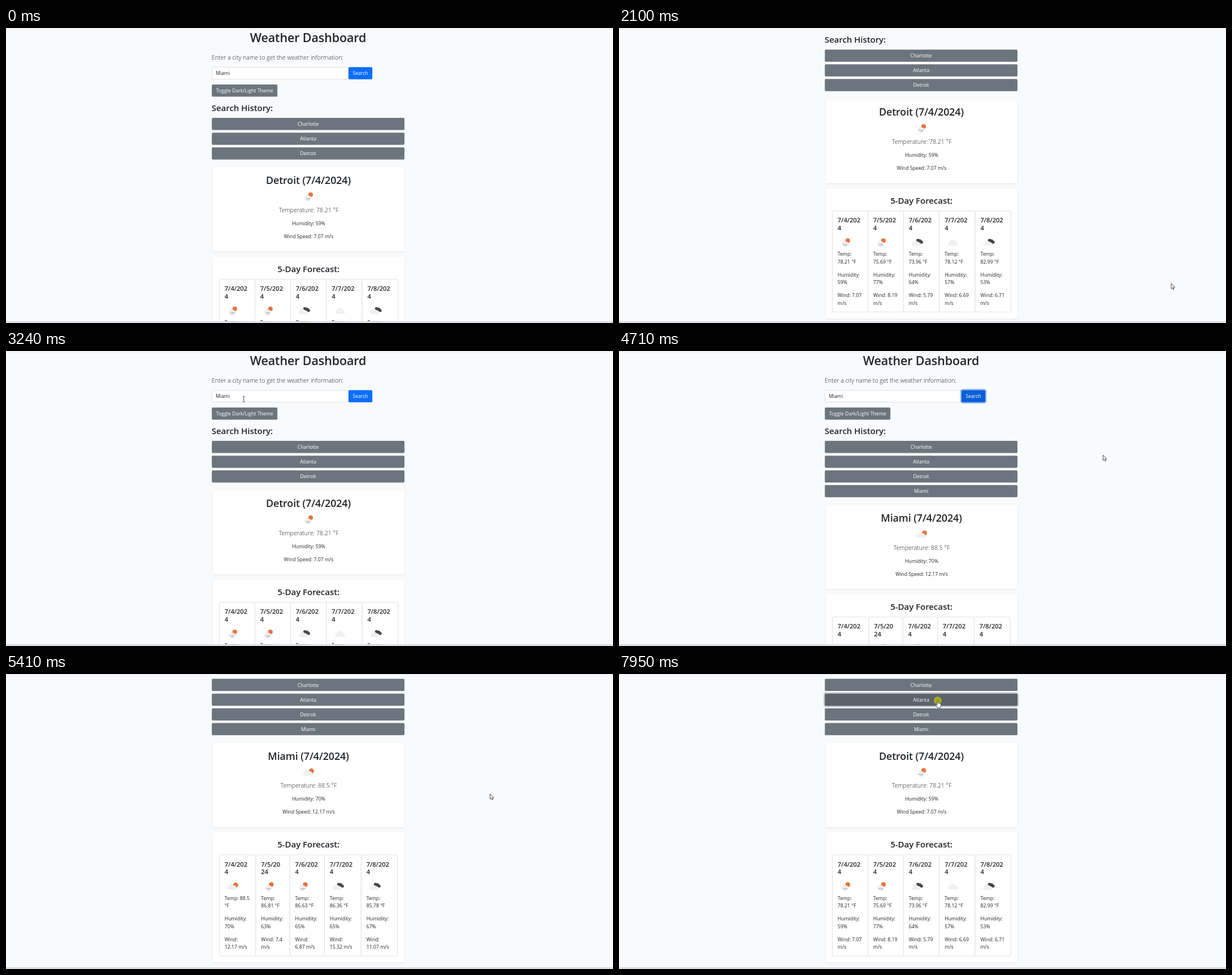
These frames come from a looping animation (1074 by 522 pixels, 8000 ms). An HTML page:

```html
<!DOCTYPE html>
<html lang="en">
<head>
<meta charset="utf-8">
<title>Weather Dashboard</title>
<style>
html, body { margin: 0; width: 100%; height: 100%; overflow: hidden; background: #f8fafc; }
svg { display: block; font: 8.7px "Open Sans", "Noto Sans", sans-serif; fill: #212529; }
.h1, .h2, .h3, .h5 { font-weight: 600; letter-spacing: -.006em; }
.h1 { font-size: 21.5px; }
.h2 { font-size: 17.9px; }
.h3 { font-size: 15.1px; }
.h5 { font-size: 11.2px; }
.lead { font-size: 10.6px; font-weight: 300; }
.mid { text-anchor: middle; }
.card { fill: #fff; filter: drop-shadow(0 1.1px 1.1px rgba(0, 0, 0, .09)); }
.box { fill: #fff; stroke: #d9dbde; stroke-width: .8; }
.btn { fill: #6c757d; }
.btn text { fill: #fff; }
.btn.on { fill: #5c636a; }
.btn.blue { fill: #0d6efd; }
.btn.blue.on { fill: #0b5ed7; }
.ring { fill: none; stroke: #c0c4c8; stroke-width: 2.3; visibility: hidden; }
.blue .ring { stroke: #98c1fe; }
.focus .ring { visibility: visible; }
.cursor path { fill: #fff; stroke: #222; stroke-width: .8; stroke-linejoin: round; }
</style>
</head>
<body>
<svg id="stage" width="1074" height="522"></svg>
<script>
const LOOP = 8000, ROW = 26.07;

const text = (x, y, cls, str) => `<text x="${x}" y="${y}" class="${cls}">${str}</text>`;
const lines = (x, y, cls, str) =>
  str.split('|').map((s, i) => text(x, y + i * 13.6, cls, s)).join('');
const rect = (x, y, w, h, cls, r = 2.5) =>
  `<rect x="${x}" y="${y}" width="${w}" height="${h}" rx="${r}" class="${cls}"/>`;

// Weather icons, centred on the origin
const cloud = (fill, move = '') => `<path fill="${fill}" transform="${move}"
  d="M-6 5.5a3.3 3.3 0 0 1 0-6.5a4.6 4.6 0 0 1 8.6-1.4a3.5 3.5 0 0 1 4.2 3.2a2.4 2.4 0 0 1 0 4.7z"/>`;
const disc = (x, y, r, fill) => `<circle cx="${x}" cy="${y}" r="${r}" fill="${fill}"/>`;
const drops = [[-4, 3.4], [-1, 3], [1.4, 3.4], [-2.6, 5.8], [.2, 5.8]]
  .map(([x, y]) => `<path d="M${x} ${y}l-.6 1.2" stroke="#48484a"/>`).join('');
const icons = {
  rain: disc(3, -2.9, 4.1, '#e5743f') + cloud('#f0f0f0', 'translate(-1.6 1.2) scale(.8)') + drops,
  sun: disc(4.4, -2, 4.5, '#e5743f') + cloud('#f0f0f0', 'translate(-1.6 .8)'),
  dark: disc(1.2, -3, 3.1, '#48484a') + disc(4.6, -2.2, 3, '#48484a') + disc(7.4, -.2, 2.7, '#48484a') +
        cloud('#f0f0f0', 'translate(-2.4 1.2) scale(.9)'),
  cloud: cloud('#f0f0f0')
};
const icon = (name, x, y) => `<g transform="translate(${x} ${y})">${icons[name]}</g>`;

const cities = [
  {
    name: 'Detroit', icon: 'rain', temp: '78.21', humid: 59, wind: '7.07',
    edges: [377.5, 440.5, 503.5, 567, 630.2, 693.5],
    days: [
      ['7/4/202|4', 'rain', 'Temp:|78.21 °F', 59, 'Wind: 7.07|m/s'],
      ['7/5/202|4', 'rain', 'Temp:|75.69 °F', 77, 'Wind: 8.19|m/s'],
      ['7/6/202|4', 'dark', 'Temp:|73.96 °F', 64, 'Wind: 5.79|m/s'],
      ['7/7/202|4', 'cloud', 'Temp:|78.12 °F', 57, 'Wind: 6.69|m/s'],
      ['7/8/202|4', 'dark', 'Temp:|82.99 °F', 53, 'Wind: 6.71|m/s']
    ]
  },
  {
    name: 'Miami', icon: 'sun', temp: '88.5', humid: 70, wind: '12.17',
    edges: [377.5, 442, 502.3, 563.5, 628.4, 692.5],
    days: [
      ['7/4/202|4', 'sun', 'Temp: 88.5|°F', 70, 'Wind:|12.17 m/s'],
      ['7/5/20|24', 'rain', 'Temp:|86.81 °F', 63, 'Wind: 7.4|m/s'],
      ['7/6/202|4', 'rain', 'Temp:|86.63 °F', 65, 'Wind:|6.87 m/s'],
      ['7/7/202|4', 'dark', 'Temp:|86.36 °F', 65, 'Wind:|15.32 m/s'],
      ['7/8/202|4', 'dark', 'Temp:|85.78 °F', 67, 'Wind:|11.07 m/s']
    ]
  }
];

const current = c => `<g class="now">
  ${text(535, 276, 'h2 mid', `${c.name} (7/4/2024)`)}
  ${icon(c.icon, 536, 298)}
  ${text(535.5, 325.5, 'lead mid', `Temperature: ${c.temp} °F`)}
  ${text(535.5, 348.8, 'mid', `Humidity: ${c.humid}%`)}
  ${text(535.5, 371.5, 'mid', `Wind Speed: ${c.wind} m/s`)}</g>`;

const forecast = c => '<g class="week">' + c.days.map(([date, pic, temp, humid, wind], i) => {
  const x = c.edges[i], tx = x + 9.3;
  return rect(x, 444.5, c.edges[i + 1] - x, 179, 'box') +
    lines(tx, 465.3, 'h5', date) + icon(pic, tx + 15, 500) +
    lines(tx, 524.3, '', temp) + lines(tx, 560.5, '', `Humidity:|${humid}%`) +
    lines(tx, 597, '', wind);
}).join('') + '</g>';

const buttons = [
  { label: 'Search', x: 605.9, y: 69.2, w: 42.3, blue: ' blue' },
  { label: 'Toggle Dark/Light Theme', x: 364.2, y: 100, w: 116 },
  ...['Charlotte', 'Atlanta', 'Detroit', 'Miami'].map((label, i) =>
    ({ label, x: 364.2, y: 159.1 + i * ROW, w: 340.8 }))
];
const [search, , , atlanta, detroit, miami] = buttons;
const button = b => `<g class="btn${b.blue || ''}">
  ${rect(b.x - 1.1, b.y - 1.1, b.w + 2.2, 23.7, 'ring', 3.5)}
  ${rect(b.x, b.y, b.w, 21.5, '', 1.8)}
  ${text(b.x + b.w / 2, b.y + 14, 'mid', b.label)}</g>`;

const stage = document.getElementById('stage');
stage.innerHTML = `
  <clipPath id="view"><rect y="2" width="1074" height="518"/></clipPath>
  <rect width="1074" height="522" fill="#f8fafc"/>
  <g clip-path="url(#view)"><g id="page">
    ${text(534.5, 24.8, 'h1 mid', 'Weather Dashboard')}
    ${text(363.8, 56, 'lead', 'Enter a city name to get the weather information:')}
    ${rect(364.5, 69.6, 242.5, 20.8, 'box', 2.2)}
    ${text(371, 83.3, '', 'Miami')}
    ${text(363.8, 146.5, 'h3', 'Search History:')}
    ${buttons.map(button).join('')}
    <g id="report">
      ${rect(366, 247, 339, 148.5, 'card')}
      ${rect(366, 404.8, 339, 230.5, 'card')}
      ${text(535.2, 431.7, 'h3 mid', '5-Day Forecast:')}
      ${cities.map(current).join('')}${cities.map(forecast).join('')}
    </g>
  </g></g>
  <path d="M0 1.5h1074" stroke="#e3e5e9"/>
  <path d="M0 520.2h1074" stroke="#cdd0d8" stroke-width="2"/>
  <circle id="click" r="7" fill="#c8c800" fill-opacity=".7"/>
  <g class="cursor">
    <path d="M0 0v9.6l2.2-2 1.5 3.3 1.5-.7-1.5-3.2h2.9z"/>
    <path d="M-2-5h1.5l.5.5.5-.5H2M0-4.5v9M-2 5h1.5l.5-.5.5.5H2" style="fill:none"/>
    <path d="M-1 .8a1 1 0 0 1 2 0v3.6l3.6.9q1.4.5 1.2 2l-.7 3.2-.8 2.2H-.4l-1-2.2-2.3-2.8q-.3-1.4 1.2-1.1l1.5 1.2z"/>
  </g>`;

const page = document.getElementById('page'), report = document.getElementById('report');
const clickDot = document.getElementById('click');
const cursor = stage.querySelector('.cursor');
const groups = [...stage.querySelectorAll('.btn')];
const now = stage.querySelectorAll('.now'), week = stage.querySelectorAll('.week');

// Pointer path: time, x, y
const path = [
  [860, 1050, 512], [1250, 988, 453], [1620, 981, 451], [1690, 977, 452], [2500, 977, 452],
  [3160, 416, 95], [3240, 420, 85], [3340, 492, 83], [3790, 627, 81], [4410, 627, 81],
  [4640, 859, 180], [4710, 856.5, 184], [5260, 857, 209], [5410, 856.5, 212], [5800, 856.5, 212],
  [6500, 565, 74], [6850, 565, 74], [7190, 565, 50], [7500, 565, 50], [7800, 564, 47]
];
const clicks = [[3940, 4090], [6580, 6720], [7800, LOOP]];

const between = (t, a, b) => t >= a && t < b;
const show = (el, on) => el.style.display = on ? '' : 'none';
const place = (el, x, y) => el.setAttribute('transform', `translate(${x} ${y})`);
const ramp = (t, a, b) => {
  const u = Math.min(1, Math.max(0, (t - a) / (b - a)));
  return u * u * (3 - 2 * u);
};

function pointer(t) {
  const i = path.findIndex(k => k[0] > t);
  if (i < 1) return path.at(i).slice(1);
  const [a, b] = [path[i - 1], path[i]], u = (t - a[0]) / (b[0] - a[0]);
  return [a[1] + (b[1] - a[1]) * u, a[2] + (b[2] - a[2]) * u];
}

function draw(t) {
  const scroll = 124.5 * (ramp(t, 1083, 1620) - ramp(t, 2067, 2400)) + 150.5 * ramp(t, 4750, 5260);
  place(page, 0, -scroll);

  const added = t >= 4100;
  place(report, 0, added ? ROW : 0);
  const nowCity = +between(t, 4100, 6790), weekCity = +between(t, 4180, 6860);
  now.forEach((g, i) => show(g, i === nowCity));
  week.forEach((g, i) => show(g, i === weekCity));
  show(groups[5], added);

  const [x, y] = pointer(t), py = y + scroll, visible = t >= 860;
  const inside = b => visible && (b !== miami || added) &&
    between(x, b.x, b.x + b.w) && between(py, b.y, b.y + 21.5);
  const focus = t < 3940 ? null : t < 6580 ? search : t < 7800 ? detroit : atlanta;
  buttons.forEach((b, i) => {
    groups[i].classList.toggle('on', inside(b) || b === focus);
    groups[i].classList.toggle('focus', b === focus);
  });

  const shape = buttons.some(inside) ? 2 : between(x, 364, 606) && between(py, 69, 91) ? 1 : 0;
  [...cursor.children].forEach((c, i) => show(c, i === shape));
  show(cursor, visible);
  place(cursor, x, y);
  show(clickDot, clicks.some(([a, b]) => between(t, a, b)));
  place(clickDot, x, y);
}

const start = performance.now();
(function tick() {
  draw((performance.now() - start) % LOOP);
  requestAnimationFrame(tick);
})();
</script>
</body>
</html>
```
